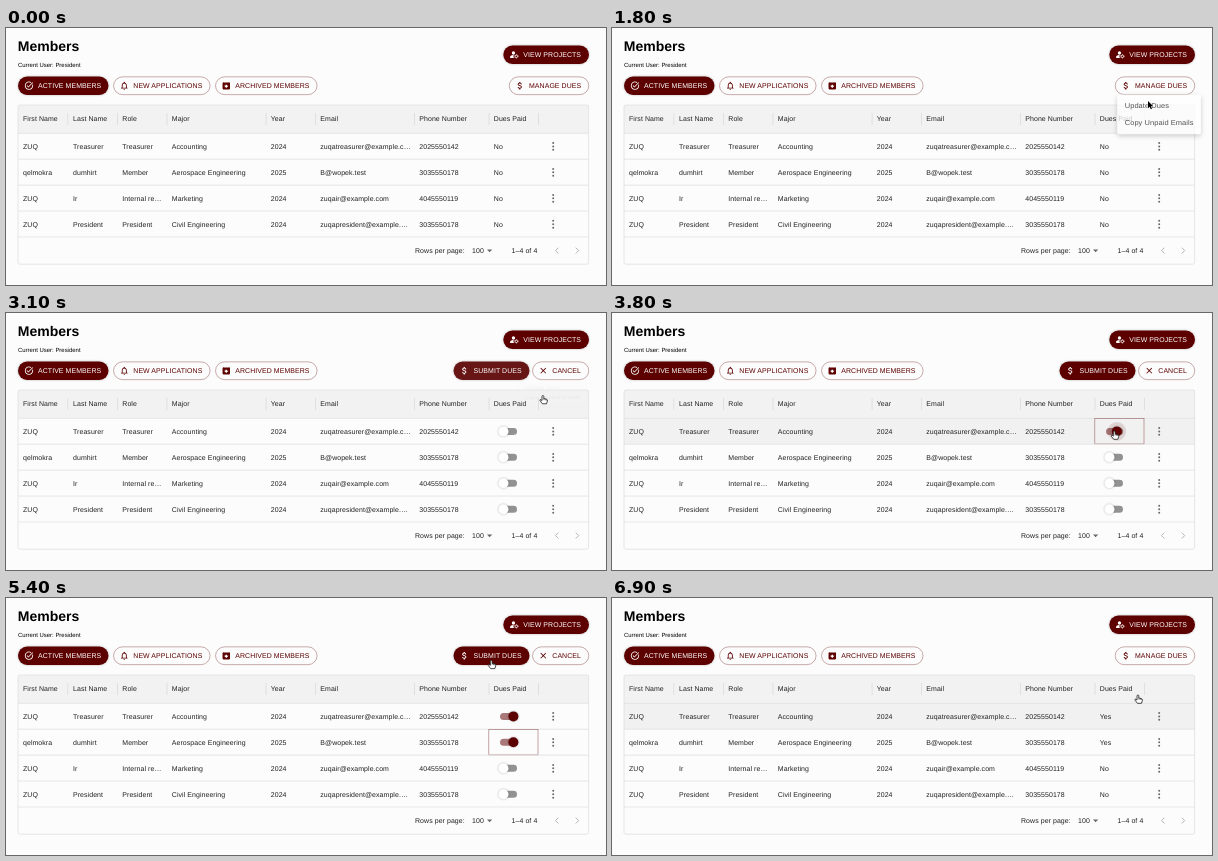
Write an HTML page that moves like this. It is 600 by 257 pixels and loops after 7000 ms.

```html
<!DOCTYPE html>
<html lang="en">
<head>
<meta charset="utf-8">
<title>Members</title>
<style>
  html, body { margin: 0; width: 100%; height: 100%; overflow: hidden; background: #fcfcfc; }
  svg { display: block; }
  text {
    font: 6.96px "Liberation Sans", Arial, sans-serif;
    letter-spacing: .0107em;
    fill: #212121;
    white-space: pre;
    text-rendering: geometricPrecision;
  }
  .title { font-size: 14px; font-weight: bold; letter-spacing: 0; fill: #000; }
  .note { font-size: 5.96px; letter-spacing: 0; fill: #000; }
  .item { font-size: 7.95px; letter-spacing: .0094em; }
  .raised { filter: drop-shadow(0 .8px .8px rgba(0, 0, 0, .28)); }
  .paper { filter: drop-shadow(0 2px 3px rgba(0, 0, 0, .26)); }
</style>
</head>
<body>
<svg id="stage" width="600" height="257" viewBox="0 0 600 257"></svg>
<script>
const LOOP = 7000, STEP = 100;
const MAROON = '#5c0000', LINE = '#e0e0e0';
const ROW_TOP = 105, ROW_H = 25.95;

const ICONS = {
  check: 'M22 5.18 10.59 16.6l-4.24-4.24 1.41-1.41 2.83 2.83 10-10L22 5.18zm-2.21 5.04c.13.57.21 1.17.21 1.78 0 4.42-3.58 8-8 8s-8-3.58-8-8 3.58-8 8-8c1.58 0 3.04.46 4.28 1.25l1.44-1.44C16.1 2.67 14.13 2 12 2 6.48 2 2 6.48 2 12s4.48 10 10 10 10-4.48 10-10c0-1.19-.22-2.33-.6-3.39l-1.61 1.61z',
  bell: 'M12 22c1.1 0 2-.9 2-2h-4c0 1.1.89 2 2 2zm6-6v-5c0-3.07-1.64-5.64-4.5-6.32V4c0-.83-.67-1.5-1.5-1.5s-1.5.67-1.5 1.5v.68C7.63 5.36 6 7.92 6 11v5l-2 2v1h16v-1l-2-2zm-2 1H8v-6c0-2.48 1.51-4.5 4-4.5s4 2.02 4 4.5v6z',
  archive: 'm20.54 5.23-1.39-1.68C18.88 3.21 18.47 3 18 3H6c-.47 0-.88.21-1.16.55L3.46 5.23C3.17 5.57 3 6.02 3 6.5V19c0 1.1.9 2 2 2h14c1.1 0 2-.9 2-2V6.5c0-.48-.17-.93-.46-1.27zM12 17.5 6.5 12H10v-2h4v2h3.5L12 17.5zM5.12 5l.81-1h12l.94 1H5.12z',
  dollar: 'M11.8 10.9c-2.27-.59-3-1.2-3-2.15 0-1.09 1.01-1.85 2.7-1.85 1.78 0 2.44.85 2.5 2.1h2.21c-.07-1.72-1.12-3.3-3.21-3.81V3h-3v2.16c-1.94.42-3.5 1.68-3.5 3.61 0 2.31 1.91 3.46 4.7 4.13 2.5.6 3 1.48 3 2.41 0 .69-.49 1.79-2.7 1.79-2.06 0-2.87-.92-2.98-2.1h-2.2c.12 2.19 1.76 3.42 3.68 3.83V21h3v-2.15c1.95-.37 3.5-1.5 3.5-3.55 0-2.84-2.43-3.81-4.7-4.4z',
  close: 'M19 6.41 17.59 5 12 10.59 6.41 5 5 6.41 10.59 12 5 17.59 6.41 19 12 13.41 17.59 19 19 17.59 13.41 12z',
  person: 'M6 8a4 4 0 1 0 8 0a4 4 0 1 0-8 0zM10.67 13.02C10.45 13.01 10.23 13 10 13c-2.42 0-4.68.67-6.61 1.82C2.51 15.34 2 16.32 2 17.35V20h9.26C10.47 18.87 10 17.49 10 16c0-1.07.25-2.07.67-2.98z'
};

const COLUMNS = [
  [17, 'First Name'], [67, 'Last Name'], [116.3, 'Role'], [165.8, 'Major'],
  [264.8, 'Year'], [314.3, 'Email'], [413.3, 'Phone Number'], [487.8, 'Dues Paid']
];
const MEMBERS = [
  ['ZUQ', 'Treasurer', 'Treasurer', 'Accounting', '2024', 'zuqatreasurer@example.c…', '2025550142'],
  ['qelmokra', 'dumhirt', 'Member', 'Aerospace Engineering', '2025', 'B@wopek.test', '3035550178'],
  ['ZUQ', 'Ir', 'Internal re…', 'Marketing', '2024', 'zuqair@example.com', '4045550119'],
  ['ZUQ', 'President', 'President', 'Civil Engineering', '2024', 'zuqapresident@example.…', '3035550178']
];

// Pointer: time, x, y, hand
const POINTER = [
  [300, 560, 254, 0], [500, 557, 205, 0], [800, 548, 105, 0], [1000, 544, 68, 1],
  [1200, 542, 65, 1], [1500, 540, 62, 1], [1700, 538, 64, 0], [1900, 534, 82, 1],
  [2200, 528, 104, 1], [2300, 527, 106.5, 0], [2400, 536, 84, 1], [2500, 537, 82.5, 1],
  [3100, 537, 82.5, 1], [3200, 535, 86, 0], [3500, 508, 115, 0], [3600, 503, 118, 1],
  [3900, 502, 118, 1], [4200, 500, 136, 0], [4400, 499, 143, 1], [4700, 499, 143, 1],
  [4900, 497, 122, 0], [5200, 489, 72, 0], [5300, 486, 62, 1], [5600, 484, 63, 0],
  [5900, 479, 110, 0], [6100, 478, 116, 0], [6400, 480, 117, 0], [6600, 496, 120, 0],
  [6800, 516.5, 121, 0], [6900, 526, 97, 1], [7000, 526, 97, 1]
];
const TOGGLED = [3700, 4500, Infinity, Infinity];
const EDIT = 2900, LOAD = 5600, DONE = 6400;

const stage = document.getElementById('stage');
const clamp = v => Math.max(0, Math.min(1, v));
const smooth = v => v * v * (3 - 2 * v);
const show = (node, on) => node.setAttribute('display', on ? 'inline' : 'none');

function el(tag, attrs, parent = stage) {
  const node = document.createElementNS('http://www.w3.org/2000/svg', tag);
  set(node, attrs);
  return parent.appendChild(node);
}
function set(node, attrs) {
  for (const k in attrs) node.setAttribute(k, attrs[k]);
}
function label(x, y, str, parent, attrs = {}) {
  const node = el('text', { x, y, ...attrs }, parent);
  node.textContent = str;
  return node;
}
function button(x, y, width, str, icon, filled, parent) {
  const g = el('g', {}, parent), ink = filled ? '#fff' : MAROON;
  const inset = filled ? 0 : .25;
  const body = el('rect', {
    x: x + inset, y: y + inset, width: width - 2 * inset, height: 18.3 - 2 * inset, rx: 9.1,
    ...(filled ? { fill: MAROON, class: 'raised' }
               : { fill: 'none', stroke: MAROON, 'stroke-opacity': .55, 'stroke-width': .6 })
  }, g);
  const art = el('g', { transform: `translate(${x + 6} ${y + 4.1}) scale(.415)`, fill: ink }, g);
  el('path', { d: ICONS[icon] }, art);
  if (icon === 'person') {
    const ring = { cx: 17, cy: 16, fill: 'none', stroke: ink };
    el('circle', { ...ring, r: 2.9, 'stroke-width': 1.9 }, art);
    el('circle', { ...ring, r: 4.3, 'stroke-width': 1.6, 'stroke-dasharray': '2.2 2.3' }, art);
  }
  label(x + 20, y + 11.8, str, g, { style: `fill:${ink}` });
  return { g, body };
}

const page = el('g', {});
label(11.8, 23.4, 'Members', page, { class: 'title' });
label(12, 38.8, 'Current User: President', page, { class: 'note' });
button(12, 48.6, 90.5, 'ACTIVE MEMBERS', 'check', true, page);
button(107.3, 48.6, 97, 'NEW APPLICATIONS', 'bell', false, page);
button(209.3, 48.6, 102, 'ARCHIVED MEMBERS', 'archive', false, page);
button(497.3, 17.6, 85.7, 'VIEW PROJECTS', 'person', true, page);
const manage = button(503, 48.6, 80, 'MANAGE DUES', 'dollar', false, page);
const submit = button(447.5, 48.6, 76, 'SUBMIT DUES', 'dollar', true, page);
const cancel = button(526.3, 48.6, 56.7, 'CANCEL', 'close', false, page);

// Table
el('rect', { x: 12, y: 77, width: 571, height: 28, fill: '#f2f2f2' }, page);
for (const k of [1, 2, 3, 5, 6, 8, 9.5, 10.5])
  el('rect', { x: 12 + 49.55 * k, y: 85, width: .6, height: 12, fill: '#d4d4d4' }, page);
for (const [x, name] of COLUMNS) label(x, 93.3, name, page);

const rows = MEMBERS.map((cells, i) => {
  const top = ROW_TOP + ROW_H * i, mid = top + ROW_H / 2 + .4;
  const hover = el('rect', { x: 12, y: top, width: 571, height: ROW_H, fill: '#f1f1f1' }, page);
  el('rect', { x: 12, y: top - .2, width: 571, height: .8, fill: LINE }, page);
  cells.forEach((str, c) => label(COLUMNS[c][0], mid + 2.4, str, page));
  const dues = label(COLUMNS[7][0], mid + 2.4, 'No', page);
  for (const d of [-3.4, 0, 3.4])
    el('circle', { cx: 547.2, cy: mid + d, r: 1, fill: '#6a6a6a' }, page);

  const toggle = el('g', {}, page);
  const focus = el('rect', {
    x: 482.8, y: top + .5, width: 49.2, height: ROW_H - .5,
    fill: 'none', stroke: MAROON, 'stroke-opacity': .5, 'stroke-width': .7
  }, toggle);
  const track = el('rect', { x: 494, y: mid - 3.5, width: 17, height: 7, rx: 3.5 }, toggle);
  const halo = el('circle', { cy: mid, r: 9.3 }, toggle);
  const thumb = el('circle', { cy: mid, r: 5, class: 'raised' }, toggle);
  return { hover, dues, toggle, focus, track, halo, thumb };
});

el('rect', { x: 12, y: 208.6, width: 571, height: .8, fill: LINE }, page);
label(409, 225, 'Rows per page:', page);
label(466, 225, '100', page);
label(505.6, 225, '1–4 of 4', page);
el('path', { d: 'M481 221.6h5.2l-2.6 2.6z', fill: '#666' }, page);
el('path', {
  d: 'M552.4 219.7l-2.9 2.9 2.9 2.9M569.8 219.7l2.9 2.9-2.9 2.9',
  fill: 'none', stroke: '#b4b4b4', 'stroke-width': 1
}, page);
el('rect', { x: 12, y: 77, width: 570.6, height: 159.2, rx: 2, fill: 'none', stroke: LINE, 'stroke-width': .8 }, page);

// Menu
const menu = el('g', {});
el('rect', { x: 502.8, y: 66.5, width: 89, height: 44.5, rx: 2, fill: '#fff', class: 'paper' }, menu);
const pick = el('rect', { x: 502.8, y: 70.5, width: 89, height: 18, fill: '#f4f4f4' }, menu);
label(510.8, 82, 'Update Dues', menu, { class: 'item' });
label(510.8, 100.2, 'Copy Unpaid Emails', menu, { class: 'item' });

const spinner = el('circle', { r: 9.2, fill: 'none', stroke: MAROON, 'stroke-width': 1.7, pathLength: 127 });

const pointer = el('g', {});
const arrow = el('path', {
  d: 'M0 0V7.2L1.7 5.7 2.8 8.3 4 7.8 2.9 5.3H5.2Z',
  fill: '#000', stroke: '#fff', 'stroke-width': .6, 'paint-order': 'stroke'
}, pointer);
const hand = el('g', { fill: '#fff', stroke: '#111', 'stroke-width': .75, 'stroke-linejoin': 'round' }, pointer);
el('path', { d: 'M-1 .9C-1-.3 .8-.3 .8 .9V3L3.6 3.7Q4.7 4.1 4.4 5.4L3.5 8.3H-.6L-3 5.2Q-3.4 3.8-2.2 4.2L-1 5.1Z' }, hand);
el('path', { d: 'M.8 3v1.6M2.2 3.4v1.4M3.4 3.8v1.2', 'stroke-width': .5 }, hand);

function pointerAt(t) {
  let i = 0;
  while (i < POINTER.length - 2 && POINTER[i + 1][0] <= t) i++;
  const a = POINTER[i], b = POINTER[i + 1], p = clamp((t - a[0]) / (b[0] - a[0]));
  return { x: a[1] + (b[1] - a[1]) * p, y: a[2] + (b[2] - a[2]) * p, hand: a[3] };
}

function drawRows(t, editing) {
  const lag = pointerAt(t - STEP);
  const modal = t >= 1600 && t < 3200;
  const over = t > 300 && !modal ? Math.floor((lag.y - ROW_TOP) / ROW_H) : -1;
  rows.forEach((r, i) => {
    show(r.hover, i === over);
    show(r.dues, !editing);
    show(r.toggle, editing);
    r.dues.textContent = t >= DONE && i < 2 ? 'Yes' : 'No';
    if (!editing) return;
    const p = smooth(clamp((t - TOGGLED[i]) / 150));
    const focused = t >= TOGGLED[i] && !(t >= TOGGLED[i + 1]);
    const touched = i === over && lag.x < 514 && lag.x > 488 && t < 4900;
    const cx = 497.5 + 9.9 * p;
    show(r.focus, focused);
    set(r.track, { fill: p > .4 ? MAROON : '#000', 'fill-opacity': .42 + .1 * p });
    set(r.thumb, { cx, fill: p > .4 ? MAROON : '#fff' });
    set(r.halo, {
      cx, fill: p > .4 ? MAROON : '#000',
      'fill-opacity': touched ? (t - TOGGLED[i] >= 0 && t - TOGGLED[i] < 300 ? .12 : .05) : 0
    });
  });
}

function drawMenu(t) {
  const open = smooth(clamp((t - 1650) / 220)), shut = clamp((t - EDIT) / 210);
  const alpha = open * (1 - shut), grow = 1 - (1 - open) - shut;
  show(menu, alpha > 0);
  const sx = .75 + .25 * grow, sy = .5625 + .4375 * grow;
  set(menu, {
    opacity: alpha,
    transform: `translate(543 66.5) scale(${sx} ${sy}) translate(-543 -66.5)`
  });
  show(pick, t >= 2400);
}

function drawSpinner(t) {
  const p = ((t - LOAD + 30) / 1400) % 1;
  const half = smooth((p * 2) % 1);
  const size = p < .5 ? 1 + 99 * half : 100;
  const skip = p < .5 ? 15 * half : 15 + 110 * half;
  set(spinner, {
    transform: `translate(297.2 142) rotate(${360 * p})`,
    'stroke-dasharray': `${size} 200`,
    'stroke-dashoffset': -skip
  });
}

function draw(t) {
  const loading = t >= LOAD && t < DONE, editing = t >= EDIT && t < LOAD;
  show(page, !loading);
  show(spinner, loading);
  show(manage.g, !editing);
  show(submit.g, editing);
  show(cancel.g, editing);
  submit.body.setAttribute('fill-opacity', clamp((t - EDIT + 50) / 280));
  drawRows(t, editing);
  drawMenu(t);
  if (loading) drawSpinner(t);

  const at = pointerAt(t);
  show(pointer, t >= 300);
  show(arrow, !at.hand);
  show(hand, at.hand);
  pointer.setAttribute('transform', `translate(${at.x} ${at.y})`);
}

const start = performance.now();
function tick() {
  const t = (performance.now() - start) % LOOP;
  draw(Math.floor(t / STEP) * STEP);
  requestAnimationFrame(tick);
}
tick();
</script>
</body>
</html>
```
